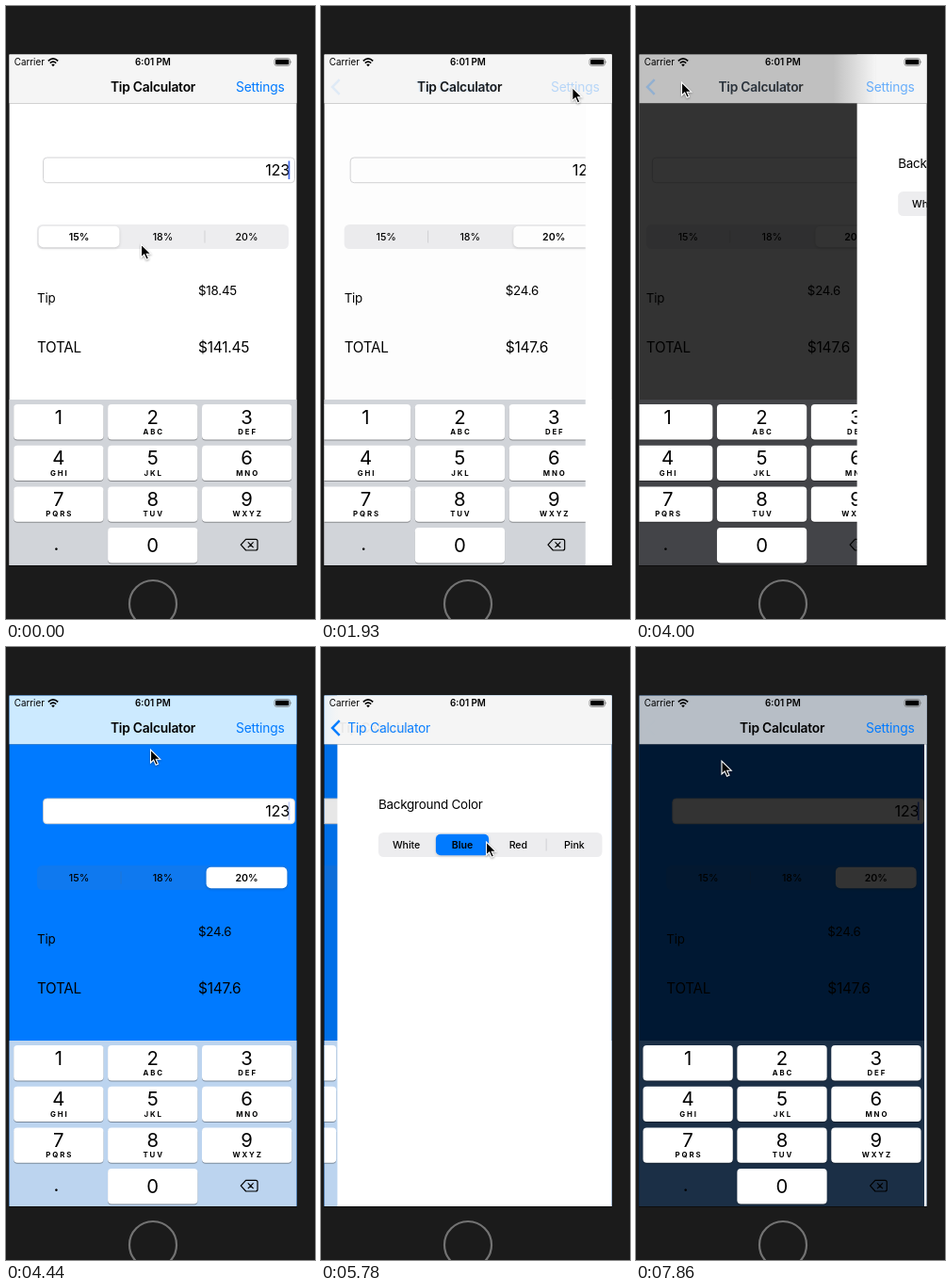
Recreate the animation shown at these times as an HTML page. Size 328 px wide and 651 px high, loop 8000 ms.

```html
<!DOCTYPE html>
<html lang="en">
<head>
<meta charset="utf-8">
<title>Tip Calculator</title>
<style>
  html, body { margin: 0; width: 100%; height: 100%; overflow: hidden; background: #1b1b1b; }
  svg { display: block; width: 100vw; height: 100vh; }
  text { font-family: Inter, Roboto, sans-serif; font-size: 13.8px; letter-spacing: -.015em; fill: #000; white-space: pre; }
  .mid { text-anchor: middle; }
  .semi { font-weight: 600; }
  .link { fill: #007aff; }
  .status { font-size: 9.8px; letter-spacing: 0; }
  .body { font-size: 13.3px; }
  .big { font-size: 15.5px; }
  .seg text { font-size: 10.6px; font-weight: 500; letter-spacing: 0; }
  .seg text.on { font-weight: 600; }
  .thumb { filter: drop-shadow(0 1px 1.5px rgba(0, 0, 0, .16)); }
  .digit { font-size: 20.3px; letter-spacing: 0; }
  .letters { font-size: 7.8px; font-weight: 700; letter-spacing: 1.9px; }
</style>
</head>
<body>
<svg viewBox="0 0 328 651">
  <defs>
    <clipPath id="screen"><rect x="3.5" y="51.5" width="305" height="542.5"/></clipPath>
    <linearGradient id="fade">
      <stop offset="0" stop-color="#f5f5f5" stop-opacity="0"/>
      <stop offset="1" stop-color="#f5f5f5"/>
    </linearGradient>
  </defs>

  <rect width="328" height="651" fill="#1b1b1b"/>
  <rect x="3.5" y="51.5" width="305" height="542.5" fill="#fff" stroke="#000"/>
  <circle cx="156" cy="635" r="25" fill="none" stroke="#737373" stroke-width="2.2"/>

  <g clip-path="url(#screen)">
    <g id="main">
      <rect id="page" x="3" y="51" width="400" height="545"/>
      <rect x="39.5" y="161" width="267" height="26.7" rx="4" fill="#fff" stroke="#cfcfd1" stroke-width=".9"/>
      <text x="301" y="180.3" text-anchor="end" style="font-size:16.3px">123</text>
      <rect id="caret" x="299.6" y="164.5" width="1.7" height="19.5" fill="#4068e8"/>
      <g id="rates" class="seg"></g>
      <text class="body" x="33" y="314.7">Tip</text>
      <text class="body" x="204" y="307.3" id="tip"></text>
      <text class="big" x="33" y="368" style="font-size:15.2px">TOTAL</text>
      <text class="big" x="204" y="368" id="total"></text>
      <rect id="dim" x="3" y="51" width="400" height="545"/>
      <rect id="pad" x="3" y="418" width="400" height="177"/>
      <g id="keys"></g>
    </g>

    <g id="settings">
      <rect x="3.5" y="51" width="306" height="545" fill="#fff"/>
      <text x="47" y="171.6" style="font-size:13.4px">Background Color</text>
      <g id="colors" class="seg"></g>
    </g>

    <rect id="bar" x="3" y="51" width="306" height="52.3"/>
    <g id="barFade">
      <rect width="45.5" height="52.3" y="51" fill="url(#fade)"/>
      <rect x="45" width="400" height="52.3" y="51" fill="#f5f5f5"/>
    </g>
    <rect x="3" y="103" width="306" height=".8" fill="rgba(0,0,0,.22)"/>

    <text id="title" class="mid semi" y="90.7">Tip Calculator</text>
    <text id="open" class="link" x="244" y="90.7">Settings</text>
    <path id="chevron" d="M19.7 78.2 L12 86 L19.7 93.8" fill="none" stroke="#007aff" stroke-width="2.5"/>
    <text id="back" class="link" y="90.7">Tip Calculator</text>

    <text class="status" x="8.8" y="63.4">Carrier</text>
    <text class="status mid semi" x="156" y="63.4">6:01 PM</text>
    <g fill="none" stroke="#000" stroke-width="1.7">
      <path d="M44.8 58.3 Q50 53.6 55.2 58.3"/>
      <path d="M46.8 60.6 Q50 57.8 53.2 60.6"/>
    </g>
    <path d="M48.2 62.2 Q50 60.7 51.8 62.2 L50 64.2 Z"/>
    <rect x="285" y="55.6" width="16.4" height="7.8" rx="2.2" fill="none" stroke="#777" stroke-width=".8"/>
    <rect x="286.1" y="56.7" width="14.2" height="5.6" rx="1.2"/>
    <path d="M302.3 58 Q303.8 59.5 302.3 61 Z" fill="#777"/>
  </g>

  <path id="cursor" d="M0 0 V14 L3.2 11 L5.6 16.3 L8 15.2 L5.7 10.2 H10.2 Z" stroke="#fff" stroke-width="1.1"
        style="filter:drop-shadow(0 1px 1px rgba(0,0,0,.35))"/>
</svg>

<script>
const LOOP = 8000, FRAMES = 54, STIFF = 18, WIDTH = 305, SETTLE = 500;
const $ = id => document.getElementById(id);

function add(parent, tag, attrs, text) {
  const el = document.createElementNS('http://www.w3.org/2000/svg', tag);
  for (const k in attrs) el.setAttribute(k, attrs[k]);
  if (text) el.textContent = text;
  parent.appendChild(el);
  return el;
}
const move = (el, x, y = 0) => el.setAttribute('transform', `translate(${x} ${y})`);

// Critically damped spring, 0 to 1
const spring = ms => {
  if (ms <= 0) return 0;
  const s = STIFF * ms / 1000;
  return ms >= SETTLE ? 1 : 1 - (1 + s) * Math.exp(-s);
};

function segmented(group, x, y, cell, names) {
  add(group, 'rect', { x, y, width: cell * names.length, height: 26, rx: 5.5, fill: 'rgba(118,118,128,.13)' });
  const seps = names.slice(1).map((_, i) =>
    add(group, 'rect', { x: x + cell * (i + 1) - .4, y: y + 6.5, width: .8, height: 13, fill: 'rgba(100,100,110,.25)' }));
  const thumb = add(group, 'rect', { class: 'thumb', x: x + 1.6, y: y + 1.7, width: cell - 3.2, height: 22.6, rx: 5 });
  const labels = names.map((n, i) =>
    add(group, 'text', { class: 'mid', x: x + cell * (i + .5), y: y + 16.9 }, n));
  return (pos, on, fill) => {
    move(thumb, pos * cell);
    thumb.setAttribute('fill', fill);
    labels.forEach((l, i) => l.setAttribute('class', i === on ? 'mid on' : 'mid'));
    seps.forEach((s, i) => s.setAttribute('opacity', i === on || i === on - 1 ? 0 : 1));
  };
}

const setRate = segmented($('rates'), 33, 232, 89, ['15%', '18%', '20%']);
const setColor = segmented($('colors'), 47, 197, 59.4, ['White', 'Blue', 'Red', 'Pink']);

// Keypad
const letters = ['', 'ABC', 'DEF', 'GHI', 'JKL', 'MNO', 'PQRS', 'TUV', 'WXYZ'];
function key(col, row, digit, sub) {
  const x = 8.2 + col * 99.9, y = 423 + row * 43.7, mid = x + 47.6, keys = $('keys');
  const box = { x, width: 95.3, height: 37.4, rx: 4 };
  add(keys, 'rect', { ...box, y: y + 1, fill: 'rgba(0,0,0,.35)' });
  add(keys, 'rect', { ...box, y, fill: '#fff' });
  add(keys, 'text', { class: 'digit mid', x: mid, y: y + (row === 3 ? 25.8 : 20.6) }, digit);
  if (sub) add(keys, 'text', { class: 'letters mid', x: mid + 1, y: y + 32 }, sub);
}
letters.forEach((s, i) => key(i % 3, i / 3 | 0, String(i + 1), s));
key(1, 3, '0');
add($('keys'), 'text', { class: 'digit mid', x: 53.5, y: 577.5 }, '.');
add($('keys'), 'path', {
  d: 'M249.3 572.2 L254.6 566.3 H265 Q267 566.3 267 568.3 V576 Q267 578 265 578 H254.6 Z M256.8 569.3 L262.6 575.1 M262.6 569.3 L256.8 575.1',
  fill: 'none', stroke: '#000', 'stroke-width': 1.2, 'stroke-linejoin': 'round'
});

// Pointer stops: time, x, y
const stops = [
  [0, 143.5, 253], [280, 167, 251], [500, 171, 251], [900, 252, 250], [1185, 252.5, 252.5],
  [1750, 268, 86], [2060, 266, 87], [2518, 155.5, 187], [2870, 138, 208], [3050, 136, 208],
  [3400, 54, 87], [3600, 48.5, 81], [4000, 48.5, 81], [4444, 153.5, 109], [5000, 268, 86],
  [5480, 267, 87], [5778, 175.5, 207], [6200, 212, 208], [6500, 208, 208], [7250, 48.5, 82],
  [7500, 48.5, 82], [7852, 91, 121], [8000, 110, 125]
];
function pointer(t) {
  const i = Math.max(1, stops.findIndex(s => s[0] > t));
  const [t0, x0, y0] = stops[i - 1], [t1, x1, y1] = stops[i];
  const u = (t - t0) / (t1 - t0), e = u * u * (3 - 2 * u);
  return [x0 + (x1 - x0) * e, y0 + (y1 - y0) * e];
}

const PUSH = [1898, 5508], POP = [3848, 7469];
const RATE_CLICKS = [300, 915], COLOR_CLICK = 2900;
const pressed = (t, starts, lead) => starts.some(s => t >= s - lead && t < s + SETTLE);

function draw(t) {
  // q is the share of the settings page on screen
  const q = Math.max(0, spring(t - PUSH[0]) - spring(t - POP[0]) + spring(t - PUSH[1]) - spring(t - POP[1]));
  const popping = POP.some(s => t > s && t < s + SETTLE);
  const blue = t >= POP[0] + SETTLE;
  const d = WIDTH * (1 - q);

  const rate = RATE_CLICKS.filter(c => t >= c).length;
  const tip = 123 * [.15, .18, .2][rate];
  setRate(spring(t - RATE_CLICKS[0]) + spring(t - RATE_CLICKS[1]), rate, '#fff');
  $('tip').textContent = '$' + +tip.toFixed(2);
  $('total').textContent = '$' + +(123 + tip).toFixed(2);

  const picked = t >= COLOR_CLICK;
  setColor(spring(t - COLOR_CLICK), picked ? 1 : 0, picked ? '#007aff' : '#fff');

  move($('main'), -.3 * WIDTH * q);
  move($('settings'), d);
  $('settings').style.display = q > 0 ? '' : 'none';
  $('page').setAttribute('fill', blue ? '#007aff' : '#fff');
  $('dim').setAttribute('opacity', popping ? .8 : .1 * q);
  $('pad').setAttribute('fill', popping ? (blue ? '#1b2f46' : '#434448') : (blue ? '#bcd4ef' : '#d1d4d9'));

  const blinkFrom = t > 7400 ? 7800 : t > 4000 ? 4240 : 0;
  const blink = .5 + 1.2 * Math.cos(2 * Math.PI * ((t - blinkFrom) / 1000 + .07));
  $('caret').setAttribute('opacity', Math.min(1, Math.max(0, blink)));

  $('bar').setAttribute('fill', q === 1 ? '#f5f5f5'
    : popping ? (blue ? '#b7bec6' : '#c0c0c0') : (blue ? '#cceaff' : '#f5f5f5'));
  $('barFade').style.display = q > 0 ? '' : 'none';
  move($('barFade'), 3.5 + d - 45 + 45 * (d / WIDTH) ** 3);

  $('title').setAttribute('x', 156 - 97 * q);
  $('title').setAttribute('opacity', 1 - q);
  $('open').setAttribute('opacity', (1 - q) ** 2 * (pressed(t, PUSH, 110) ? .3 : 1));
  const backTone = q * (pressed(t, POP, 230) ? .35 : 1);
  $('back').setAttribute('x', 24.5 + 83 * (1 - q));
  $('back').setAttribute('opacity', backTone);
  $('chevron').setAttribute('opacity', popping ? q : backTone);

  move($('cursor'), ...pointer(t));
}

function tick(now) {
  const n = Math.floor((now % LOOP) * FRAMES / LOOP + .05) % FRAMES;
  draw(n * LOOP / FRAMES);
  requestAnimationFrame(tick);
}
draw(0);
const begin = performance.now();
requestAnimationFrame(function first() { tick(Math.max(0, performance.now() - begin)); });
</script>
</body>
</html>
```
